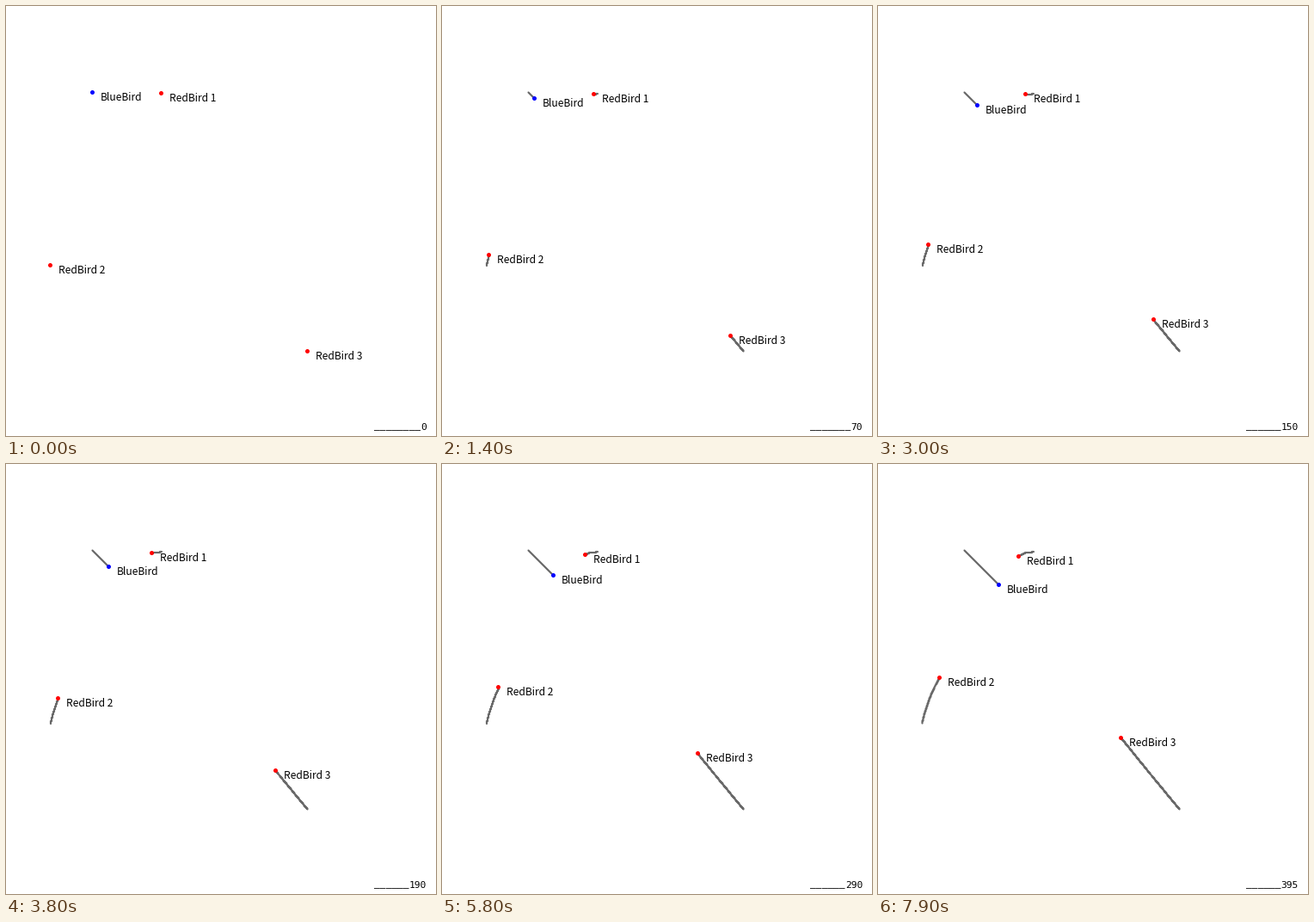
Animation of 500x500 px, one loop 8000 ms. Source, as a matplotlib script:

```python
import numpy as np
import matplotlib.pyplot as plt
from matplotlib.animation import FuncAnimation
from matplotlib.patches import Circle

SIZE, DPI = 500, 100
PX = 72 / DPI          # points per pixel
FRAMES, STEP = 80, 5   # simulation ticks per picture
SPEED = 0.1            # leader's speed along each axis

plt.rcParams["toolbar"] = "None"

fig = plt.figure(figsize=(SIZE / DPI, SIZE / DPI), dpi=DPI, facecolor="white")
ax = fig.add_axes([0, 0, 1, 1])
ax.set_xlim(0, SIZE)
ax.set_ylim(SIZE, 0)
ax.axis("off")

ticks = np.arange(FRAMES * STEP)


def snap(values):
    return np.floor(values + 0.5 + 1e-6)


def leader():
    path = 100 + ticks * SPEED
    return snap(np.column_stack([path, path]))


def chaser(x, y, rate):
    """Exact path of a bird whose velocity is rate * (leader - bird)."""
    lag = SPEED / rate
    decay = np.exp(-rate * ticks)[:, None]
    gap = (np.array([x, y]) - 100 + lag) * decay - lag
    return snap(100 + SPEED * ticks[:, None] + gap)


def write(x, y, family, size, text="", ha="left"):
    return ax.text(x, y, text, family=family, size=size * PX, color="black",
                   ha=ha, va="baseline", zorder=3)


class Bird:
    def __init__(self, name, color, path):
        self.path = path
        self.trail, = ax.plot([], [], color="#696969", lw=2.2 * PX, zorder=1,
                              solid_capstyle="round", solid_joinstyle="round")
        self.dot = ax.add_patch(Circle((0, 0), 2.5, color=color, lw=0, zorder=2))
        self.label = write(0, 0, "Noto Sans CJK JP", 12, name)

    def show(self, tick):
        x, y = self.path[tick]
        self.trail.set_data(*(self.path[:tick + 1].T + 0.5))
        self.trail.set_visible(tick > 0)
        self.dot.center = x + 0.5, y + 0.5
        self.label.set_position((x + 10, y + 10))
        return self.trail, self.dot, self.label


birds = [
    Bird("BlueBird", "#0000ff", leader()),
    Bird("RedBird 1", "#ff0000", chaser(180.3, 101.49, 0.00088)),
    Bird("RedBird 2", "#ff0000", chaser(50.6, 301.2, 0.00088)),
    Bird("RedBird 3", "#ff0000", chaser(350.4, 401.4, 0.000895)),
]
blanks = write(428, 491, "DejaVu Sans Mono", 11.2)
digits = write(489, 493, "DejaVu Sans Mono", 11.2, ha="right")


def update(frame):
    tick = frame * STEP
    number = str(tick)
    digits.set_text(number)
    blanks.set_text("_" * (9 - len(number)))
    return [part for bird in birds for part in bird.show(tick)] + [blanks, digits]


anim = FuncAnimation(fig, update, frames=FRAMES, interval=100,
                     repeat=True, repeat_delay=0, blit=False)
plt.show()
```
